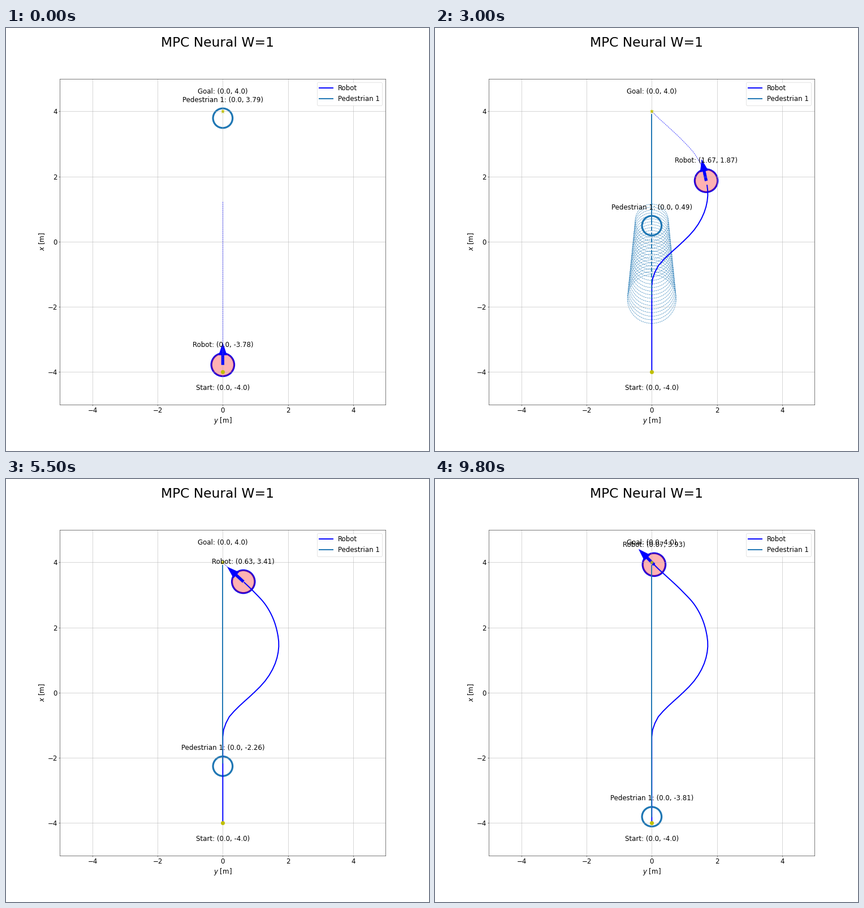
Write a matplotlib script that moves like this. It is 748x748 px and loops after 9.9 s.

```python
import numpy as np
import matplotlib.pyplot as plt
from matplotlib.animation import FuncAnimation
from matplotlib.patches import Circle, FancyArrow

FRAMES, INTERVAL = 99, 100
STEP = 0.22                # robot cruise distance per frame
SWERVE, SEEN_UNTIL = 11, 36
HORIZON = 5.0
ROBOT_R, PED_R = 0.35, 0.3
PED_COLOR = "tab:blue"

plt.rcParams.update({"font.family": "DejaVu Sans", "font.size": 18})


class Curve:
    """Smooth curve through points, addressed by arc length."""

    def __init__(self, points):
        p = np.array(points, float)
        t = np.r_[0, np.cumsum(np.hypot(*np.diff(p, axis=0).T))]
        m = np.gradient(p, t, axis=0)
        parts = [p[:1]]
        u = np.linspace(0, 1, 41)[1:, None]
        for i in range(len(p) - 1):
            h = t[i + 1] - t[i]
            parts.append((2*u**3 - 3*u**2 + 1) * p[i] + (u**3 - 2*u**2 + u) * h * m[i]
                         + (3*u**2 - 2*u**3) * p[i + 1] + (u**3 - u**2) * h * m[i + 1])
        self.xy = np.vstack(parts)
        self.s = np.r_[0, np.cumsum(np.hypot(*np.diff(self.xy, axis=0).T))]
        self.knots = self.s[::40]
        self.length = self.s[-1]

    def at(self, s):
        return np.column_stack([np.interp(s, self.s, c) for c in self.xy.T])


RUN_UP = [(0, -4), (0, -2.5), (0, -1.6), (0, -1.36), (0.025, -1.14), (0.1, -0.93), (0.2, -0.74)]
route = Curve(RUN_UP + [
    (0.335, -0.585), (0.49, -0.43), (0.98, 0.02), (1.27, 0.32), (1.5, 0.66),
    (1.66, 1.05), (1.72, 1.46), (1.67, 1.87), (1.53, 2.31), (1.31, 2.70),
    (0.94, 3.11), (0.42, 3.60), (0.2, 3.8), (0.07, 3.93), (0, 4)])
plan = Curve(RUN_UP + [
    (0.55, -0.34), (0.98, 0.08), (1.4, 0.48), (1.59, 0.78), (1.645, 1.1),
    (1.58, 1.45), (1.4, 1.77), (0.98, 2.43), (0.41, 3.35), (0, 4)])

# Cruise, then close the remaining distance roughly exponentially.
steps = np.arange(-1, FRAMES)
brake = 20
left = route.length - np.r_[STEP * (brake + 1), route.knots[[14, 17, 18, 19, 20]]]
travel = np.where(
    steps <= brake, STEP * (steps + 1),
    route.length - np.exp(np.interp(steps, [brake, 30, 46, 64, 79, 98], np.log(left))))
robot = route.at(travel)
ped = np.maximum(3.79 - 0.11 * steps, -3.81)


def forecast(n):
    s = travel[n + 1]
    if n < SWERVE:
        y = robot[n + 1, 1]
        return np.array([(0, y), (0, min(y + HORIZON, 4))])
    u = np.linspace(0, 1, 26)
    ahead = route.at(s + u * min(HORIZON, route.length - s))
    planned = plan.at(s + u * min(HORIZON, max(plan.length - s, 0)))
    planned += (robot[n + 1] - planned[0]) * (1 - u[:, None])
    w = np.clip((n - 14) / 10, 0, 1)
    return (1 - w) * planned + w * ahead


def tag(name, x, y):
    return f"{name}: ({round(float(x), 2) + 0.0}, {round(float(y), 2) + 0.0})"


fig, ax = plt.subplots(figsize=(16, 16), dpi=46.75)
fig.suptitle("MPC Neural W=1", fontsize=36)
ax.set(xlim=(-5, 5), ylim=(-5, 5), aspect="equal", xlabel="$y$ [m]", ylabel="$x$ [m]")
ax.set_xticks(range(-4, 5, 2))
ax.set_yticks(range(-4, 5, 2))
ax.grid(True)

rings = [ax.add_patch(Circle((0, 0), 0.5 + 0.01 * k, fill=False, ec=PED_COLOR, lw=1, ls="--"))
         for k in range(1, 26)]
ped_ring = ax.add_patch(Circle((0, 0), PED_R, fill=False, ec=PED_COLOR, lw=5))
body_ring = ax.add_patch(Circle((0, 0), ROBOT_R, fill=False, ec="b", lw=5))
body = ax.add_patch(Circle((0, 0), ROBOT_R, color="r", alpha=0.3))
arrow = ax.add_patch(FancyArrow(0, 0, 0, 0.3, width=0.08, color="b"))

robot_line, = ax.plot([], [], "b", lw=3, label="Robot")
ped_line, = ax.plot([], [], color=PED_COLOR, lw=3, label="Pedestrian 1")
ped_ahead, = ax.plot([], [], color=PED_COLOR, lw=3, ls="--")
ahead_line, = ax.plot([], [], "b--", lw=1)
ax.plot(0, -4, "yo", ms=10)
ax.plot(0, 4, "y*", ms=10)
ax.legend(loc="upper right")

ax.text(0, -4.55, tag("Start", 0, -4), ha="center")
ax.text(0, 4.55, tag("Goal", 0, 4), ha="center")
robot_tag = ax.text(0, 0, "", ha="center")
ped_tag = ax.text(0, 0, "", ha="center")


def update(n):
    i = n + 1
    x, y = robot[i]
    p = ped[i]

    robot_line.set_data(*robot[:i].T)
    ped_line.set_data(np.zeros(i), ped[:i] + (steps[:i] < 0) * 0)
    ahead_line.set_data(*forecast(n).T)

    body.center = body_ring.center = (x, y)
    ped_ring.center = (0, p)
    turn = robot[min(i + 1, FRAMES)] - robot[i - 1]
    dx, dy = 0.3 * turn / np.hypot(*turn)
    arrow.set_data(x=x, y=y, dx=dx, dy=dy)

    seen = SWERVE <= n <= SEEN_UNTIL
    centers = 3.74 - 0.1 * n - 0.1 * np.arange(1, 26)
    for ring, c in zip(rings, centers):
        ring.center = (0, c)
        ring.set_visible(seen)
    ped_ahead.set_data(np.zeros(25), centers)
    ped_ahead.set_visible(seen)

    robot_tag.set_text(tag("Robot", x, y))
    robot_tag.set_position((x, y + ROBOT_R + 0.2))
    ped_tag.set_text(tag("Pedestrian 1", 0, p))
    ped_tag.set_position((0, p + PED_R + 0.2))


anim = FuncAnimation(fig, update, frames=FRAMES, interval=INTERVAL, repeat=True,
                     repeat_delay=0, init_func=lambda: [], cache_frame_data=False)
plt.show()
```
